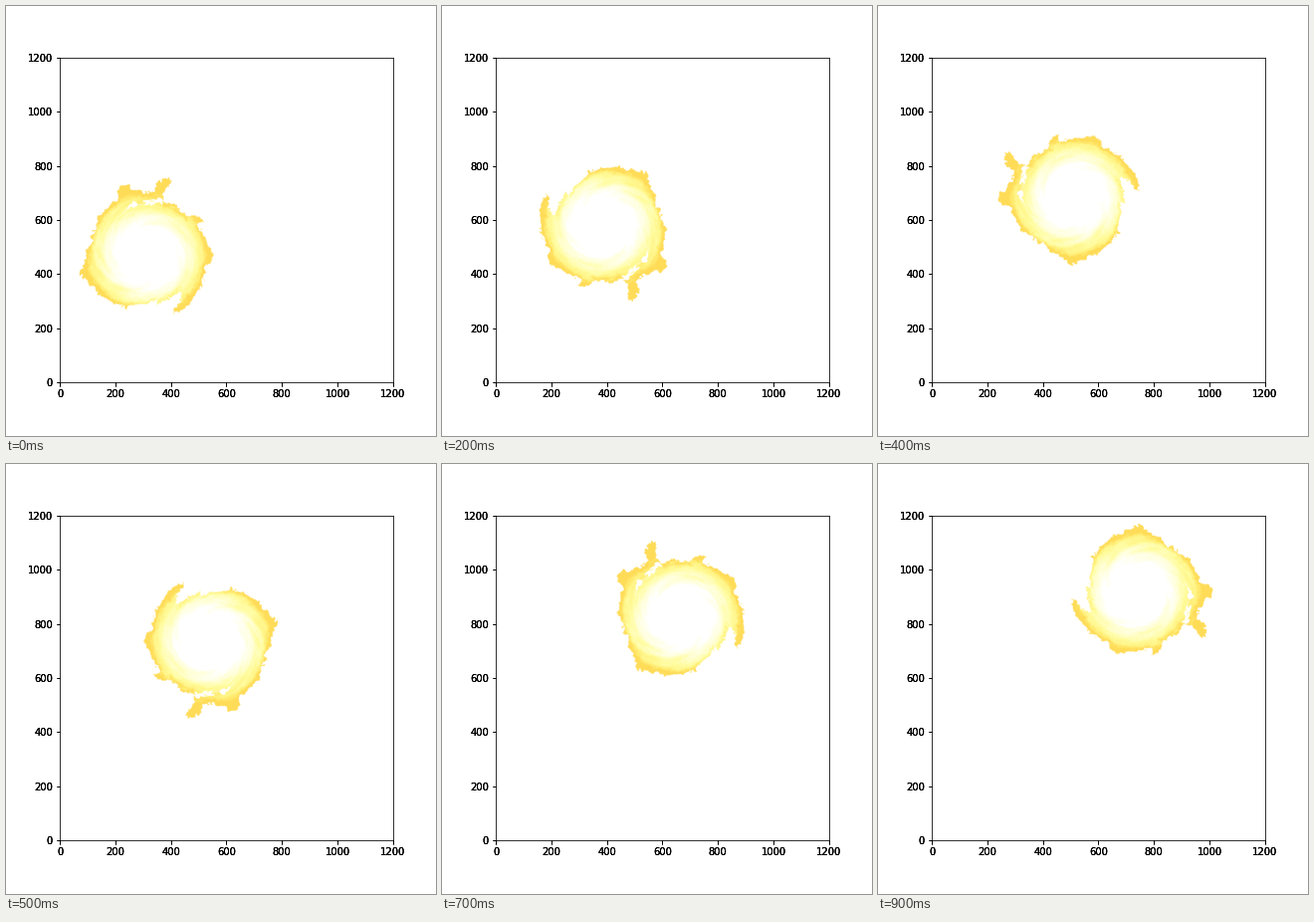
Animation, 432 px wide and 432 px high, one loop 1 s. Source, as a matplotlib script:

```python
import matplotlib.pyplot as plt
import numpy as np
from matplotlib.animation import FuncAnimation
from matplotlib.colors import LinearSegmentedColormap
from matplotlib.path import Path
from matplotlib.transforms import Affine2D

FRAMES, INTERVAL = 10, 100
LIMIT = 1200
START = np.array([301, 476])    # storm centre in data units
DRIFT, SPIN = 50, 108           # units and degrees per frame
UNITS = 3.63                    # data units per storm unit
HALF, SIZE = 92, 368            # storm half width and raster size
ARM_PITCH = 9

rng = np.random.default_rng(12)

# Outline as (angle in degrees, radius), clockwise from the longest wisp.
OUTLINE = [
    (73, 82), (69, 78), (73, 62), (68, 55), (60, 57), (39, 56), (38, 63),
    (29, 67), (27, 60), (16, 62), (0, 69), (-9, 69), (-13, 63), (-29, 66),
    (-50, 68), (-65, 70), (-62, 64), (-52, 60), (-45, 55), (-64, 52),
    (-77, 56), (-74, 50), (-88, 53), (-107, 58), (-122, 60), (-139, 61),
    (-163, 66), (-170, 60), (169, 54), (142, 56), (133, 59), (117, 60),
    (111, 71), (101, 72), (98, 64), (88, 62), (80, 65), (76, 80),
]
STORM = LinearSegmentedColormap.from_list("storm", [
    (0, "#ffffff"), (0.3, "#ffffd2"), (0.55, "#fffc9e"),
    (0.8, "#ffef78"), (1, "#ffdc58"),
])


def noise(u, v, rows, cols):
    """Smooth wrapping value noise in -1..1, one lattice cell per unit."""
    grid = rng.uniform(-1, 1, (rows, cols))
    i, j = np.floor(u).astype(int), np.floor(v).astype(int)
    a, b = u - i, v - j
    a, b = a * a * (3 - 2 * a), b * b * (3 - 2 * b)

    def at(p, q):
        return grid[p % rows, q % cols]

    return ((at(i, j) * (1 - b) + at(i, j + 1) * b) * (1 - a)
            + (at(i + 1, j) * (1 - b) + at(i + 1, j + 1) * b) * a)


def streaks(radius, theta, rows, cols):
    """Noise drawn out along the spiral arms."""
    turn = 2 * np.pi
    across = (radius + ARM_PITCH * theta) / (ARM_PITCH * turn)
    return noise(across * rows, theta / turn * cols, rows, cols)


def make_storm():
    axis = (np.arange(SIZE) + 0.5) / SIZE * 2 * HALF - HALF
    x, y = np.meshgrid(axis, axis)

    def ragged(values):
        return values + sum(
            amp * noise(x / cell, y / cell, 128, 128)
            for cell, amp in ((6, 2.0), (2.5, 1.8), (1.2, 0.8)))

    wx, wy = ragged(x), ragged(y)
    angle, reach = np.array(OUTLINE, float).T
    angle = np.radians(angle)
    outline = Path(np.column_stack([reach * np.cos(angle),
                                    reach * np.sin(angle)]))

    def inside(scale):
        points = np.column_stack([wx.ravel(), wy.ravel()]) * scale
        return outline.contains_points(points).reshape(x.shape)

    radius, theta = np.hypot(x, y), np.arctan2(y, x)
    degrees = np.degrees(np.arctan2(wy, wx))
    body = inside(1)

    # Clear lane between the outer wisps and the body.
    lane = 55 - 0.2 * (degrees - 70)
    width = 1.8 + 2.0 * noise(x / 5, y / 5, 64, 64)
    body &= ~((degrees > 68) & (degrees < 117)
              & (np.abs(np.hypot(wx, wy) - lane) < width))

    eye = np.hypot(x - 3.5, y + 3)
    depth = (eye - 31) / 34
    depth += 0.13 * streaks(radius, theta, 12, 9)
    depth += 0.08 * streaks(radius, theta, 36, 26)
    depth += 0.05 * noise(x / 1.2, y / 1.2, 160, 160)
    depth += 0.13 * ~inside(1.05) + 0.10 * ~inside(1.1)
    rgba = STORM(np.clip(depth, 0, 1))
    rgba[..., 3] = body
    return rgba


fig = plt.figure(figsize=(6, 6), dpi=72, facecolor="white")
box = [0.125, 0.125, 0.775, 0.755]
ax = fig.add_axes(box)
span = HALF * UNITS
storm = ax.imshow(make_storm(), extent=(-span, span, -span, span),
                  origin="lower", aspect="auto", interpolation="bilinear")
ax.set(xlim=(0, LIMIT), ylim=(0, LIMIT))

# Stacked axes give the tick labels their heavier edges.
for layer in range(2):
    fig.add_axes(box, frameon=False, label=f"layer {layer}",
                 xlim=(0, LIMIT), ylim=(0, LIMIT))


def update(frame):
    place = Affine2D().rotate_deg(SPIN * frame)
    place.translate(*(START + DRIFT * frame))
    storm.set_transform(place + ax.transData)
    return [storm]


anim = FuncAnimation(fig, update, frames=FRAMES, interval=INTERVAL,
                     repeat=True, repeat_delay=0)
plt.show()
```
